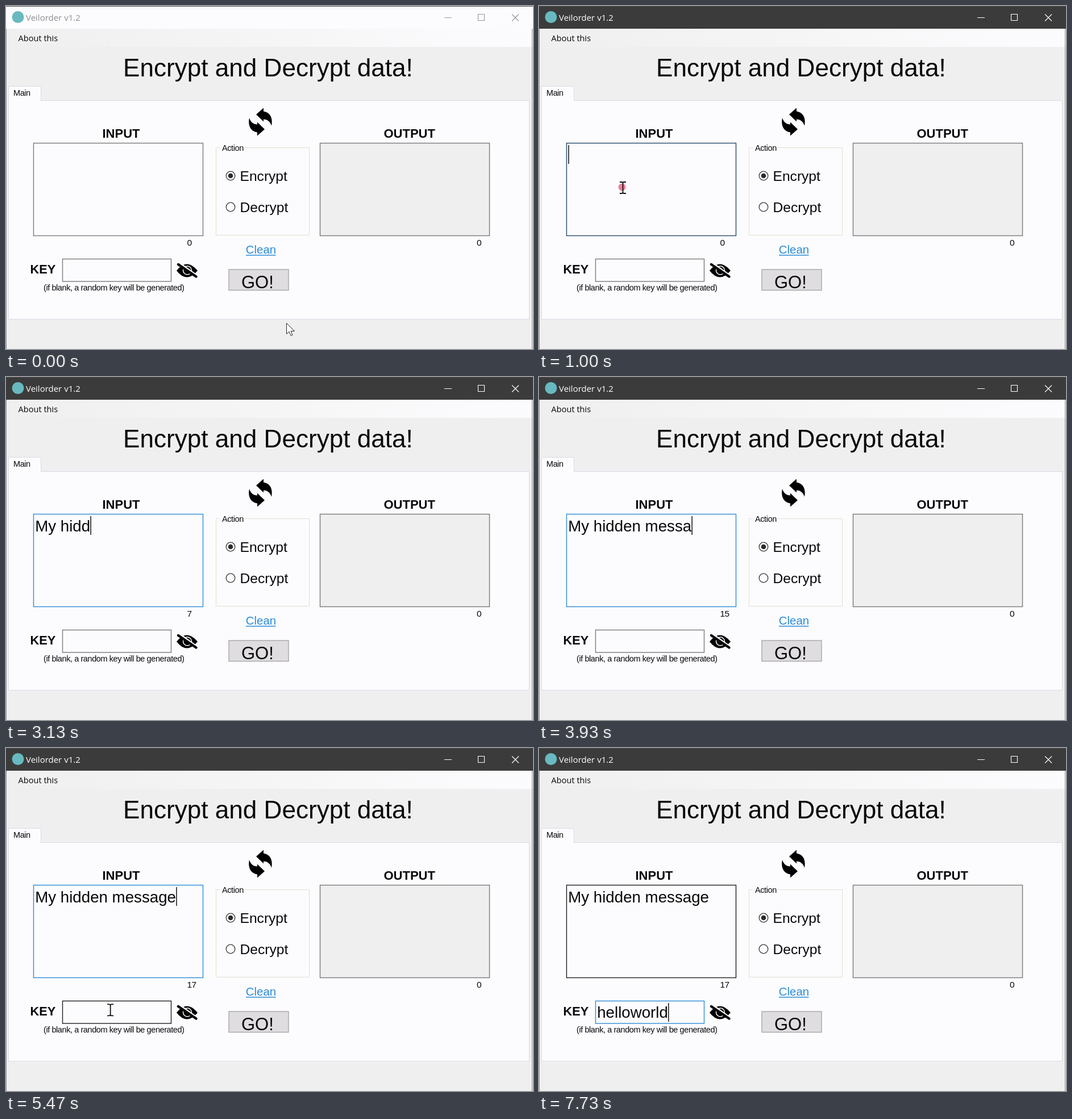
Animation of 927x604 px, one loop 8 s. Source, as an HTML page:

```html
<!DOCTYPE html>
<html lang="en">
<head>
<meta charset="utf-8">
<title>Encrypt and Decrypt data!</title>
<style>
  html, body { margin: 0; width: 100%; height: 100%; overflow: hidden; background: #f0efef; }
  svg { display: block; width: 927px; height: 604px; }
  text { font: 14.5px "Liberation Sans", Arial, sans-serif; font-kerning: none; white-space: pre; fill: #08080a; }
  .ui { font: 15px "Open Sans", sans-serif; }
  .small { letter-spacing: -.42px; }
  .count { font-size: 15.5px; letter-spacing: -.7px; }
  .head { font-size: 22px; font-weight: bold; }
  .radio { font-size: 24.6px; }
  .field { font-size: 27.7px; }
  .ring { fill: #fcfcfe; stroke: #3a3a3a; stroke-width: 1.3; }
  .box { fill: #fcfcfe; stroke: #7a7a7a; stroke-width: 1.4; }
</style>
</head>
<body>
<svg viewBox="0 0 927 604">
  <defs>
    <linearGradient id="strip">
      <stop offset="0" stop-color="#f0efef"/><stop offset="1" stop-color="#fcfcfe"/>
    </linearGradient>
    <path id="turn" d="M440 191 453 179.500V185.500C464 187 470 197 467 211 465 204 460 199.500 453 199.500V203.500Z"/>
  </defs>
  <rect width="927" height="604" fill="#f0efef"/>

  <!-- title bar and menu -->
  <rect id="bar" width="927" height="40"/>
  <circle cx="21" cy="19.500" r="10.500" fill="#68b9c0"/>
  <text id="name" class="ui" x="35" y="26">Veilorder v1.2</text>
  <path id="buttons" d="M771 20.500H784M830.500 14.500H841.500V25.500H830.500ZM890 14.500 902 26.500M902 14.500 890 26.500" fill="none" stroke-width="1.1"/>
  <rect y="40" width="927" height="32" fill="url(#strip)"/>
  <text class="ui" x="21.500" y="62" style="font-size:14.6px">About this</text>
  <path d="M0 .5H927" stroke="#4a4a4c"/>
  <path d="M.5 40V604M925.500 40V604" stroke="#8a8a90"/>

  <text x="206" y="124" style="font-size:44.1px">Encrypt and Decrypt data!</text>

  <!-- tab page -->
  <path d="M4.500 551.500V141.500H61.500V166.500H920.500V551.500Z" fill="#fcfcfe" stroke="#dad9e8"/>
  <text class="small" x="13" y="158">Main</text>
  <use href="#turn"/><use href="#turn" transform="rotate(180 447.500 204)"/>

  <text class="head" x="169.500" y="232">INPUT</text>
  <rect id="inputBox" class="box" x="48.500" y="241.500" width="298" height="163"/>
  <text id="input" class="field" x="51.200" y="272"></text>
  <text id="count" class="count" x="318.500" y="422"></text>

  <text class="head" x="664.500" y="232">OUTPUT</text>
  <rect class="box" x="552.500" y="241.500" width="298" height="163" style="fill:#f0efef"/>
  <text class="count" x="828" y="422">0</text>

  <path d="M377 249.500H369.500V403.500H533.500V249.500H420" fill="none" stroke="#dfe0d2"/>
  <text class="small" x="380" y="255">Action</text>
  <circle class="ring" cx="395" cy="299" r="7.800"/><circle cx="395" cy="299" r="4.300" fill="#2a2a2a"/>
  <text class="radio" x="411.500" y="308">Encrypt</text>
  <circle class="ring" cx="395" cy="354" r="7.800"/>
  <text class="radio" x="411.500" y="363">Decrypt</text>

  <text x="421.800" y="436" style="font-size:20.400px;fill:#2b8cd6">Clean</text>
  <path d="M422 438.700H474.500" stroke="#2b8cd6" stroke-width="1.400"/>
  <rect x="392" y="464" width="105" height="36.500" fill="#dfdde0" stroke="#a3a09f" stroke-width="1.300"/>
  <text x="414" y="497" style="font-size:31px">GO!</text>

  <text class="head" x="42.500" y="471" style="font-size:21.800px">KEY</text>
  <rect id="keyBox" class="box" x="99.500" y="445.500" width="191" height="39.500"/>
  <text id="key" class="field" x="102.200" y="475"></text>
  <text class="small" x="66" y="500.500">(if blank, a random key will be generated)</text>

  <!-- crossed-out eye -->
  <path d="M300 466Q318 443 337 466 318 489 300 466Z"/>
  <circle cx="319" cy="465.500" r="7.500" fill="none" stroke="#fcfcfe" stroke-width="1.500"/>
  <path d="M304 452.500 336 475.500" stroke="#fcfcfe" stroke-width="4.500"/>
  <path d="M303 455 334.500 476.500" stroke="#08080a" stroke-width="4.500" stroke-linecap="round"/>

  <path id="caret" stroke="#111" stroke-width="1.500"/>
  <circle id="dot" r="6.500" fill="#e0284c"/>
  <path id="arrow" d="M.5.500V19.500L5 15.500 8.200 22.500 11 21.200 8 14.500H14.500Z" fill="#fff" stroke="#222"/>
  <path id="beam" d="M-5.500-9.500H-2Q0-9.500 0-7.500 0-9.500 2-9.500H5.500M0-8V9M-5.500 10.500H-2Q0 10.500 0 8.500 0 10.500 2 10.500H5.500" fill="none" stroke="#111" stroke-width="1.800"/>
</svg>
<script>
const LOOP = 8000, INPUT_CLICK = 930, KEY_CLICK = 5600;
const el = id => document.getElementById(id);
const attr = (id, values) => { for (const k in values) el(id).setAttribute(k, values[k]); };
const show = (id, on) => el(id).style.display = on ? '' : 'none';
const clamp = x => Math.min(1, Math.max(0, x));
const ease = x => x * x * (3 - 2 * x);

const pen = document.createElement('canvas').getContext('2d');
pen.font = '27.7px "Liberation Sans", Arial, sans-serif';
pen.fontKerning = 'none';

const message = {
  text: 'My hidden message', x: 51.2, top: 245, click: INPUT_CLICK,
  keys: [1750, 2130, 2400, 2730, 2860, 2990, 3110, 3260, 3390, 3500, 3600, 3680, 3770, 3850, 3930, 4010, 4110]
};
const secret = {
  text: 'helloworld', x: 102.2, top: 449, click: KEY_CLICK,
  keys: [6180, 6330, 6720, 6730, 6790, 7000, 7130, 7270, 7400, 7530]
};
const moves = [
  { start: 330, end: 870, hide: message.keys[0], from: [493, 558], to: [147.5, 319.5] },
  { start: 4930, end: 5540, hide: secret.keys[0], from: [147.5, 319.5], to: [185, 466] }
];

const typed = (field, t) => field.text.slice(0, field.keys.filter(k => k <= t).length);

function mix(a, b, p) {
  return `rgb(${a.map((v, i) => Math.round(v + (b[i] - v) * p))})`;
}

function drawCaret(field, t) {
  const text = typed(field, t);
  const last = text ? field.keys[text.length - 1] : field.click;
  show('caret', t >= field.click && (t - last) % 1060 < 530);
  const x = field.x + 1 + pen.measureText(text).width;
  attr('caret', { d: `M${x} ${field.top}v33` });
}

function drawPointer(t) {
  const m = moves[t < moves[1].start ? 0 : 1];
  const p = ease(clamp((t - m.start) / (m.end - m.start)));
  const [x, y] = m.from.map((v, i) => v + (m.to[i] - v) * p);
  const inInput = x > 48 && x < 347 && y > 241 && y < 405;
  const inKey = x > 99 && x < 291 && y > 445 && y < 485;
  const visible = t < m.hide;
  show('beam', visible && (inInput || inKey));
  show('arrow', visible && !inInput && !inKey);
  for (const id of ['beam', 'arrow']) attr(id, { transform: `translate(${x} ${y})` });

  const age = t - (t < KEY_CLICK ? INPUT_CLICK : KEY_CLICK);
  show('dot', age >= 0 && age < 200);
  attr('dot', { cx: x - 1.5, cy: y - 0.5, opacity: 0.9 * (1 - clamp(age / 200)) });
  return { inInput, inKey };
}

function drawBorders(t, hover) {
  const idle = [122, 122, 122], dark = [32, 32, 32], blue = [48, 140, 216];
  const input = t >= KEY_CLICK ? mix(blue, dark, clamp((t - KEY_CLICK) / 200))
    : t >= INPUT_CLICK ? mix(dark, blue, clamp((t - INPUT_CLICK) / 180))
    : mix(idle, dark, hover.inInput ? 1 : 0);
  const key = t >= KEY_CLICK ? mix(dark, blue, clamp((t - KEY_CLICK) / 180))
    : mix(idle, dark, hover.inKey ? 1 : 0);
  attr('inputBox', { style: `stroke:${input}` });
  attr('keyBox', { style: `stroke:${key}` });
}

function draw(now) {
  const t = now % LOOP, active = t >= INPUT_CLICK;
  attr('bar', { fill: active ? '#3b3b3b' : '#fcfcfe' });
  attr('name', { style: `fill:${active ? '#fff' : '#8e8e90'}` });
  attr('buttons', { stroke: active ? '#fff' : '#98989a' });
  const text = typed(message, t);
  el('input').textContent = text;
  el('count').textContent = text.length;
  el('key').textContent = typed(secret, t);
  drawCaret(t < KEY_CLICK ? message : secret, t);
  drawBorders(t, drawPointer(t));
}

const begin = performance.now();
function tick() {
  draw(performance.now() - begin);
  requestAnimationFrame(tick);
}
tick();
</script>
</body>
</html>
```
